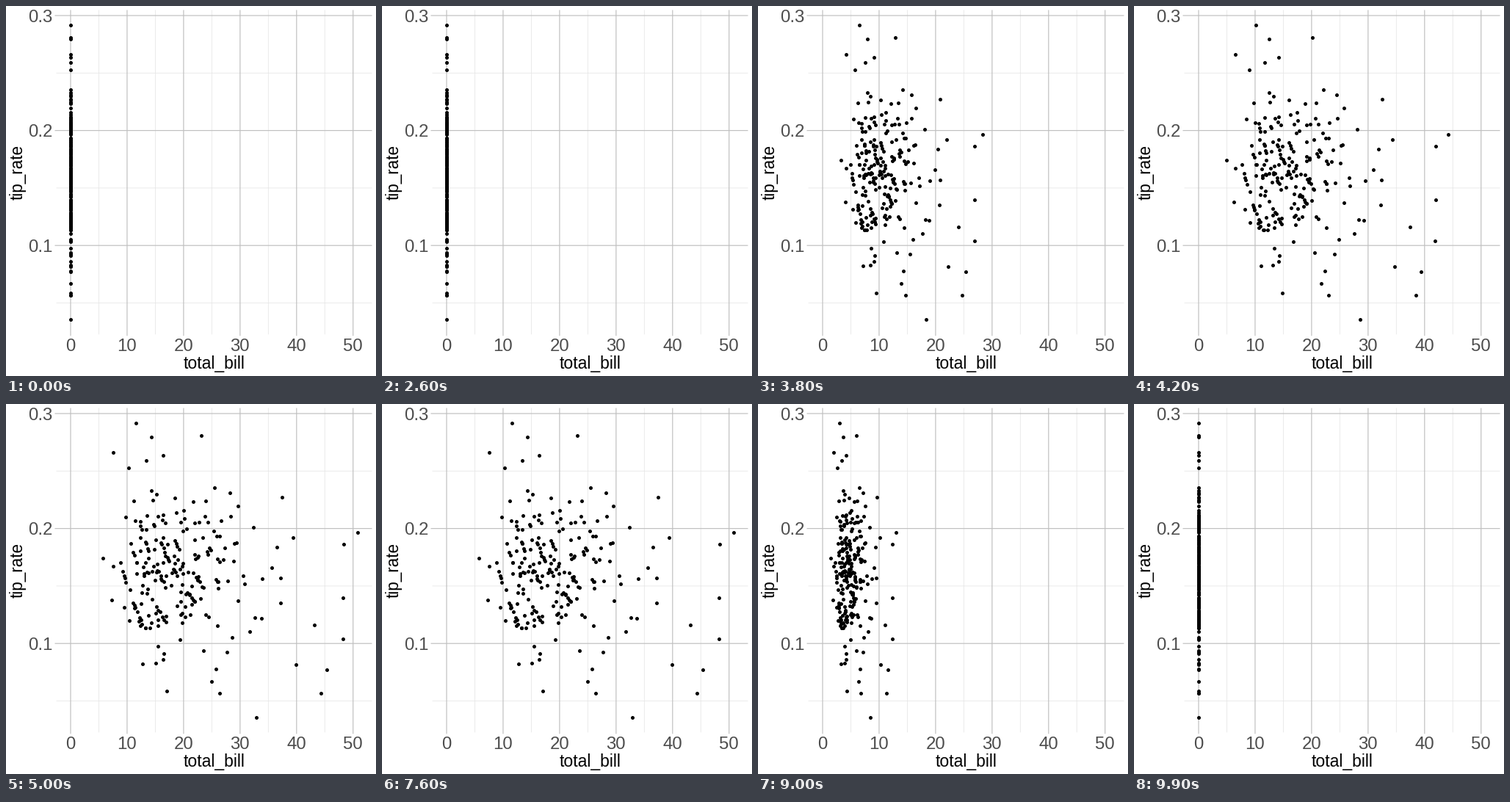
A matplotlib script that plays this animation: 504 px wide and 504 px high, repeating every 10000 ms.

```python
import numpy as np
import matplotlib.pyplot as plt
from matplotlib.animation import FuncAnimation

SIZE = 504
FRAMES, STEP_MS = 100, 100
MOVE = 25                       # frames in one transition
X0, X_UNIT = 88, 7.695          # pixel of bill 0, pixels per unit
Y0, Y_UNIT = 482.8, 1566        # pixel of rate 0, pixels per unit
LEFT, RIGHT, TOP, BOTTOM = 68.5, 498.5, 5.5, 447.3
GREY, MAJOR, MINOR = "#4d4d4d", "#c0c0c0", "#e6e6e6"
TOTAL = 241

# (bill, tip) of the points that outline the cloud
OUTLINE = [
    (50.81, 10), (48.33, 9), (48.27, 6.73), (48.17, 5), (45.35, 3.5),
    (44.3, 2.5), (43.11, 5), (39.42, 7.58), (32.83, 1.17), (28.17, 6.5),
    (26.41, 1.5), (23.17, 6.5), (17, 1), (16.32, 4.3), (14.31, 4),
    (13.42, 3.48), (11.61, 3.39), (10.29, 2.6), (7.51, 2), (5.75, 1),
    (7.25, 1), (12.75, 1.05),
]


def make_points():
    """Outline plus a random cloud; some tips are rounded to half units."""
    rng = np.random.default_rng(21)
    points = list(OUTLINE)
    while len(points) < TOTAL:
        bill = rng.lognormal(np.log(17.3), 0.4)
        tip = bill * rng.normal(0.158, 0.038)
        if rng.random() < 0.4:
            tip = round(2 * tip) / 2
        if 7.5 < bill < 41 and tip > 1.2 and 0.065 < tip / bill < 0.243:
            points.append((bill, tip))
    bills, tips = np.array(points).T
    return bills, tips / bills


def px(bill):
    return X0 + X_UNIT * bill


def py(rate):
    return Y0 - Y_UNIT * rate


def ease(t):
    return 4 * t ** 3 if t < 0.5 else 1 - 4 * (1 - t) ** 3


def spread(frame):
    """Share of the full width at a frame: hold, open, hold, close."""
    if frame <= 2 * MOVE:
        return ease(max(frame - MOVE, 0) / MOVE)
    return ease(min(4 * MOVE - frame, MOVE) / MOVE)


plt.rcParams["font.family"] = "Liberation Sans"
fig = plt.figure(figsize=(7, 7), dpi=72, facecolor="white")
ax = fig.add_axes([0, 0, 1, 1])
ax.set_xlim(0, SIZE)
ax.set_ylim(SIZE, 0)
ax.axis("off")


def grid(bills, rates, color, width, tick, z):
    style = dict(color=color, lw=width, zorder=z, solid_capstyle="butt",
                 snap=False)
    for b in bills:
        ax.plot([px(b)] * 2, [TOP, BOTTOM + tick], **style)
    for r in rates:
        ax.plot([LEFT - tick, RIGHT], [py(r)] * 2, **style)


majors_x, majors_y = range(0, 51, 10), (0.1, 0.2, 0.3)
grid(range(5, 50, 10), (0.05, 0.15, 0.25), MINOR, 0.8, 0, 1)
grid(majors_x, majors_y, MAJOR, 1.2, 2, 2)

for b in majors_x:
    ax.text(px(b), 469.5, str(b), size=24, color=GREY, ha="center")
for r in majors_y:
    ax.text(63.5, py(r) + 8.8, f"{r:.1f}", size=24, color=GREY, ha="right")
ax.text(283.5, 494, "total_bill", size=23, color="black", ha="center")
ax.text(22.5, 226, "tip_rate", size=22.5, color="black", ha="center",
        rotation=90, rotation_mode="anchor")

bills, rates = make_points()
dots = ax.scatter(px(0 * bills), py(rates), s=5 ** 2, color="black",
                  linewidths=0, zorder=3)


def update(frame):
    dots.set_offsets(np.column_stack([px(bills * spread(frame)), py(rates)]))
    return (dots,)


anim = FuncAnimation(fig, update, frames=FRAMES, interval=STEP_MS,
                     init_func=lambda: update(0), repeat=True,
                     repeat_delay=0, blit=False)
plt.show()
```
